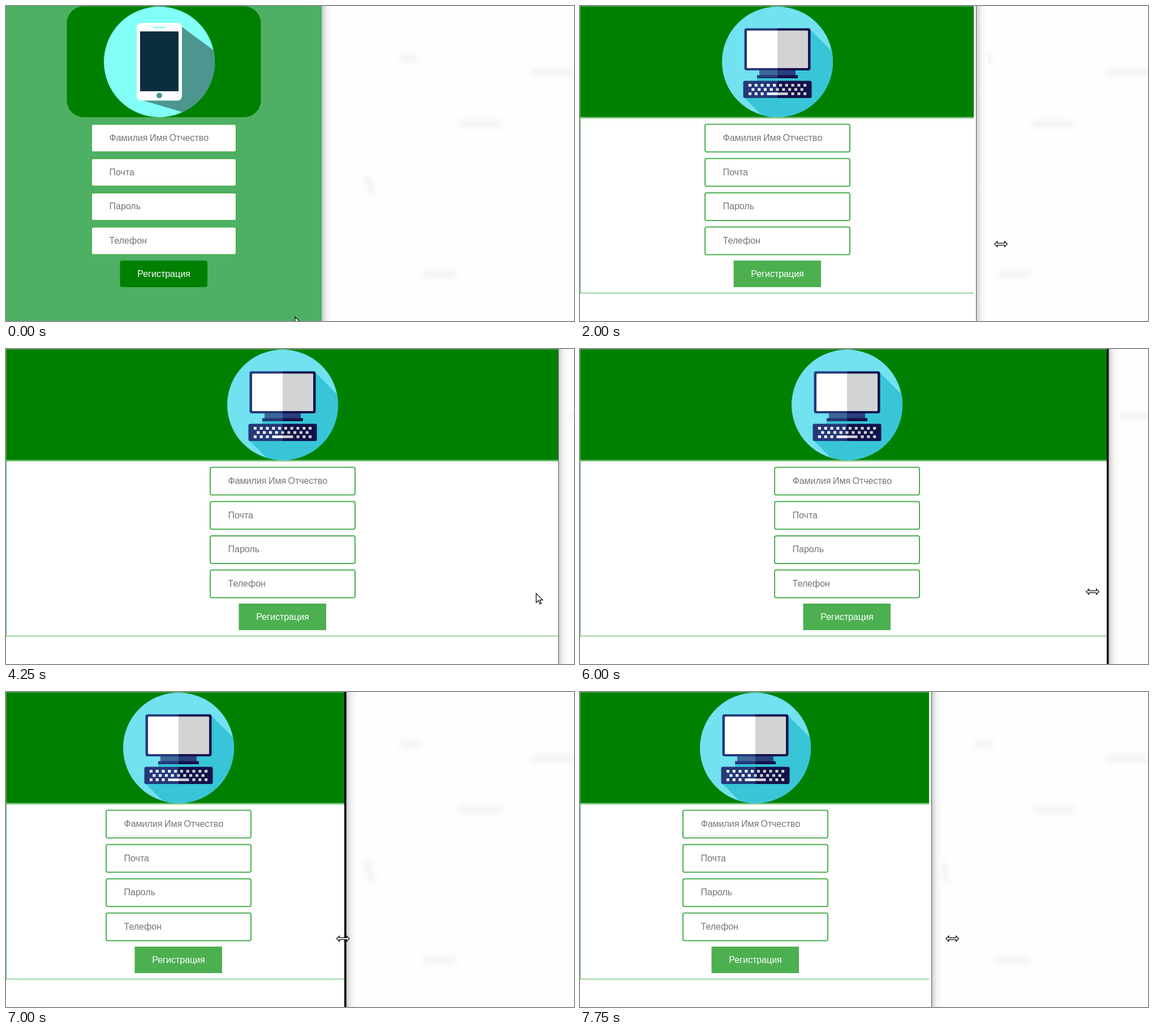
An HTML page that plays this animation: 1004x558 px, repeating every 8000 ms.

```html
<!DOCTYPE html>
<html lang="ru">
<head>
<meta charset="utf-8">
<title>Адаптивная форма регистрации</title>
<style>
  html, body { margin: 0; width: 100%; height: 100%; overflow: hidden; background: #fefefe; }
  svg { display: block; }
  text { font: 16px "Liberation Sans", Arial, sans-serif; word-spacing: -1px; fill: #757575; }
  .label { fill: #fff; text-anchor: middle; }
  .field { fill: #fff; stroke: #4caf50; stroke-width: 2; }
  .button { fill: #4caf50; }
  .mobile .button { fill: green; rx: 4px; }
  .paper { fill: #fff; }
  .mobile .paper { fill: #4eb065; }
  .mobile .wide, .narrow { display: none; }
  .mobile .narrow { display: inline; }
  .outline { fill: none; stroke: #4caf50; }
  .smudges { fill: none; stroke: #f4f4f4; stroke-width: 14; }
  .pointer { fill: #fff; stroke: #000; stroke-width: 1.2; }
</style>
</head>
<body>
<svg id="stage" width="1004" height="558" viewBox="0 0 1004 558">
  <defs>
    <clipPath id="pageClip"><rect id="pageArea" width="558" height="558"/></clipPath>
    <clipPath id="disc"><circle cy="99" r="98"/></clipPath>
    <linearGradient id="shade">
      <stop offset="0" stop-color="#c2c2c2"/>
      <stop offset=".2" stop-color="#dedede"/>
      <stop offset=".5" stop-color="#f4f4f4"/>
      <stop offset="1" stop-color="#fefefe"/>
    </linearGradient>
    <filter id="soft" x="-20%" y="-20%" width="140%" height="140%"><feGaussianBlur stdDeviation="5"/></filter>
  </defs>

  <rect width="1004" height="558" fill="#fefefe"/>
  <path class="smudges" filter="url(#soft)" d="M696 93H730M930 118H1004M800 209H876M638 300L648 335M736 476H796"/>

  <g id="frame">
    <rect width="20" height="558" fill="url(#shade)"/>
    <rect class="wide" width="1" height="558" fill="#5c5c5c"/>
  </g>
  <rect id="gap" height="558"/>

  <g clip-path="url(#pageClip)">
    <rect class="paper" width="1004" height="558"/>
    <g class="wide">
      <rect x=".5" y=".5" width="1100" height="196.5" fill="green" stroke="#4caf50"/>
      <rect class="outline" x=".5" y="198.5" width="1100" height="310"/>
    </g>
    <g id="content">
      <g class="narrow">
        <rect x="-171.5" y=".5" width="343" height="196.5" rx="30" fill="green"/>
        <rect class="outline" x="-171.5" y="198.5" width="343" height="310"/>
        <g transform="translate(-8)">
          <circle cy="99" r="98" fill="#82fff7"/>
          <path clip-path="url(#disc)" d="M40 37L129 103V214L-30 167Z" fill="#4d9690"/>
          <rect x="-40" y="30" width="80" height="137.5" rx="8" fill="#fff"/>
          <rect x="-34" y="45" width="68" height="106" fill="#0b2e3f"/>
          <rect x="-11" y="37" width="22" height="2.5" rx="1" fill="#82fff7"/>
          <circle cy="158.5" r="5" fill="#4d9690"/>
        </g>
      </g>
      <g class="wide">
        <circle cy="99" r="98" fill="#72e1f0"/>
        <path clip-path="url(#disc)" d="M56 40L110 94V211H-10L-59 162L-36 134V126Z" fill="#38c5d8"/>
        <g id="computer"></g>
      </g>
      <g id="fields"></g>
      <rect class="button" x="-77.5" y="451" width="154.5" height="47"/>
      <text class="label" y="480">Регистрация</text>
    </g>
  </g>

  <path id="arrow" class="pointer" d="M0 0V16L4 12.5L6.5 18.5L9 17.5L6.5 11.5H11.5Z"/>
  <path id="resize" class="pointer" d="M-11.2 0L-6.5 -4.8V-1.7H6.5V-4.8L11.2 0L6.5 4.8V1.7H-6.5V4.8Z"/>
</svg>

<script>
const $ = id => document.getElementById(id);
const LOOP = 8000, STEP = 250, BREAKPOINT = 580;
const LAG = 90;   // ms the page trails the pointer while dragged
const GRIP = 13;  // px from the page edge to the pointer

function add(parent, tag, attrs, text) {
  const el = document.createElementNS('http://www.w3.org/2000/svg', tag);
  for (const name in attrs) el.setAttribute(name, attrs[name]);
  if (text) el.textContent = text;
  parent.append(el);
  return el;
}

// A box centred on x = 0, lit on the left and shaded on the right.
function halves(half, y, height, left, right, rx = 0) {
  const id = 'tone' + y;
  const tone = add($('computer'), 'linearGradient', { id });
  add(tone, 'stop', { offset: .5, 'stop-color': left });
  add(tone, 'stop', { offset: .5, 'stop-color': right });
  add($('computer'), 'rect', { x: -half, y, width: half * 2, height, rx, fill: `url(#${id})` });
}

function drawComputer() {
  const light = '#24397a', dark = '#12124b', grey = '#d1d3d4';
  halves(32, 112, 12, '#3d6899', '#2b3f80');
  halves(36, 122.5, 5.5, light, dark);
  halves(58.5, 39.5, 74.5, light, dark, 4);
  halves(54, 43.5, 66.5, '#fff', grey, 1.5);
  halves(60.5, 132.5, 30.5, light, dark, 3);
  for (let row = 0; row < 3; row++) {
    const count = row === 1 ? 9 : 10;
    for (let i = 0; i < count; i++) {
      const x = (i - (count - 1) / 2) * 10.8;
      if (row === 2 && Math.abs(x) < 20) continue;
      add($('computer'), 'rect', {
        x: x - 2.5, y: 138 + row * 7.5, width: 5, height: 4.8,
        fill: x < 0 ? '#fff' : grey
      });
    }
  }
  halves(18.5, 153.2, 4.6, '#fff', grey);
}

function drawFields() {
  ['Фамилия Имя Отчество', 'Почта', 'Пароль', 'Телефон'].forEach((hint, i) => {
    const y = 209.5 + i * 60.7;
    add($('fields'), 'rect', { class: 'field', x: -128, y, width: 256, height: 49, rx: 3 });
    add($('fields'), 'text', { x: -96.5, y: Math.round(y + 29.3) }, hint);
  });
}

const ramp = (t, from, to) => Math.min(1, Math.max(0, (t - from) / (to - from)));
const smooth = u => u * u * (3 - 2 * u);
const easeOut = u => Math.sin(u * Math.PI / 2);

// The page is dragged wide, then narrow, then wide again.
const pageWidth = t => 558
  + 418 * smooth(ramp(t, 1400, 2960))
  - 420 * easeOut(ramp(t, 5894, 7444))
  + 139 * ramp(t, 7553, 8000);

// The pointer comes up to the edge, leads each drag and strays once in between.
function pointerAt(t) {
  const away = 1 - ramp(t, 0, 1000);
  const stray = Math.sin(Math.PI * ramp(t, 4000, 5250)) ** 2;
  return {
    x: pageWidth(t + LAG) + GRIP - 60 * smooth(away) - 150 * stray,
    y: 416 + 14 * ramp(t, 1500, 2700) + 7 * ramp(t, 6000, 7000) + 135 * away ** 2 + 26 * stray ** 2,
    isArrow: away > 0 || stray > .01
  };
}

const move = (id, x, y = 0) => $(id).setAttribute('transform', `translate(${x} ${y})`);

function render(now) {
  const time = Math.floor(now % LOOP / STEP) * STEP;
  const width = pageWidth(time), page = Math.round(width);
  const pull = pageWidth(time + LAG) - width;
  const isMobile = width < BREAKPOINT, isShrinking = pull < 0;
  const gap = isShrinking ? 3 : pull > 0 ? 4 : 0;
  const shift = isShrinking ? 6.5 : isMobile ? 0 : 1;

  $('stage').setAttribute('class', isMobile ? 'mobile' : '');
  $('pageArea').setAttribute('width', page);
  move('content', Math.round(width / 2 + shift));
  move('frame', page + gap);
  $('gap').setAttribute('x', page);
  $('gap').setAttribute('width', gap);
  $('gap').setAttribute('fill', isShrinking || isMobile ? '#000' : '#fff');

  const { x, y, isArrow } = pointerAt(time);
  move('arrow', x, y);
  move('resize', x, y);
  $('arrow').style.display = isArrow ? '' : 'none';
  $('resize').style.display = isArrow ? 'none' : '';
}

drawComputer();
drawFields();

const start = performance.now();
function tick() {
  render(performance.now() - start);
  requestAnimationFrame(tick);
}
tick();
</script>
</body>
</html>
```
